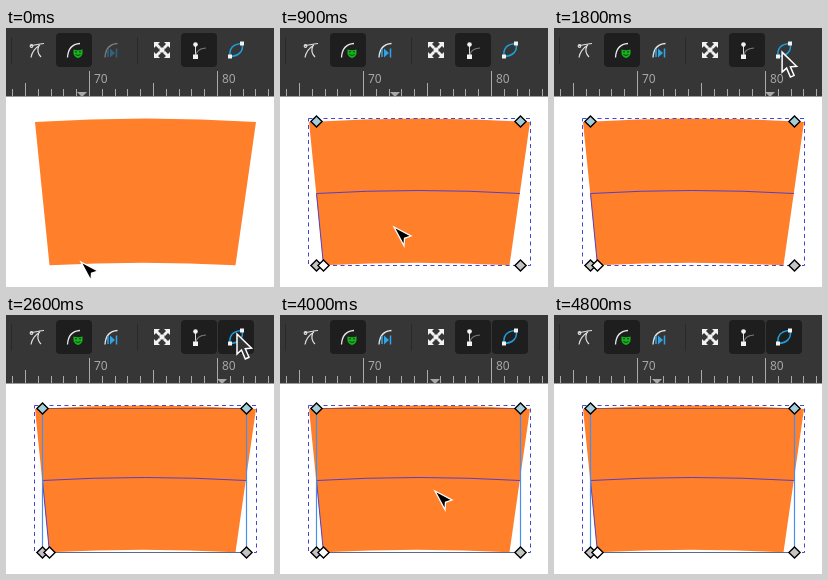
Animation, 268 px wide and 259 px high, one loop 5.3 s. Source, as an HTML page:

```html
<!DOCTYPE html>
<html lang="en">
<head>
<meta charset="utf-8">
<title>Node editing</title>
<style>
  html, body { margin: 0; width: 100%; height: 100%; overflow: hidden; background: #fff; }
  svg { display: block; width: 268px; height: 259px; }
  text { font: 12px "Noto Sans", "Open Sans", sans-serif; fill: #a6a6a6; }
</style>
</head>
<body>
<svg viewBox="0 0 268 259" fill="none">
  <defs>
    <path id="arc" d="M61.5 29.5C62 21 66 16 74 15.5" stroke="#e6e6e6" stroke-width="1.3"/>
    <path id="node" d="M0 -5.6L5.6 0L0 5.6L-5.6 0Z" stroke="#000" stroke-width="1.4"/>
    <path id="arrowOut" d="M-8 -8h6l-2 2 3 3-2 2-3-3-2 2z" fill="#f2f2f2"/>
  </defs>

  <rect width="268" height="259" fill="#fff"/>
  <path d="M29 94Q139.500 87 250 94L229.500 237.300Q137 232.300 43.500 237.300Z" fill="#ff7f2a"/>

  <g id="selection">
    <rect x="28.500" y="90.500" width="222" height="147" stroke="#4747d6" stroke-dasharray="4 3.500"/>
    <path d="M43.500 237.500L36.500 165.500Q138 159.500 240 165.500" stroke="#5540c8"/>
    <g id="outline">
      <path d="M36.500 93.500H240.500" stroke="#96504a"/>
      <path d="M36.500 93.500V237.500M240.500 93.500V237.500" stroke="#4590ee" stroke-width="1.200"/>
      <path d="M36.500 237.500H240.500" stroke="#596a91"/>
    </g>
    <g id="nodes"></g>
  </g>

  <rect width="268" height="68.500" fill="#363636"/>
  <path d="M5.500 9V36M131.500 9V36" stroke="#292929"/>
  <g fill="#1e1e1e">
    <rect x="50" y="5" width="36" height="34" rx="4"/>
    <rect x="175" y="5" width="36" height="34" rx="4"/>
    <rect id="outlineButton" x="212" y="5" width="36" height="34" rx="4"/>
  </g>

  <g stroke="#e0e0e0" stroke-width="1.200">
    <path d="M25 17.500C29 17.500 31 16 38 15.500M25 29.500C26 24 29 20 34 17M33 17.500C31 22 32 26 35 29"/>
    <circle cx="25.500" cy="18" r="1.300"/>
  </g>
  <use href="#arc"/>
  <path d="M67.500 21.500Q72 23 76.500 21.500V26Q75 29.500 72 30Q69 29.500 67.500 26Z" fill="#13b51a"/>
  <path d="M69 23.800h2M73 23.800h2M69.500 26.500Q72 28.500 74.500 26.500" stroke="#123b12"/>
  <g id="nextIcon">
    <use href="#arc" x="37.500"/>
    <path d="M104 20.500L109 25L104 29.500Z" fill="#2fa4e7"/>
    <path d="M110.500 20.500V29.500M102 21V29" stroke="#2fa4e7" stroke-width="1.500"/>
  </g>
  <g id="transformIcon"><rect x="153.500" y="19.500" width="5" height="5" fill="#f2f2f2"/></g>
  <path d="M189.500 17V28" stroke="#ddd"/>
  <path d="M190 28C190 23 193 20.500 200 20" stroke="#777" stroke-width="1.200"/>
  <circle cx="189.500" cy="16.500" r="2.300" fill="#f2f2f2"/>
  <rect x="187" y="26.500" width="5" height="4.500" fill="#f2f2f2"/>
  <path d="M224 28.500C223 20 227 16 236 15.500C238 23 233 28 224 28.500Z" stroke="#1c9fdc" stroke-width="1.500"/>
  <path d="M222 26.500h4v4h-4zM234 13.500h4v4h-4z" fill="#f2f2f2"/>

  <path id="ticks" stroke="#aaa"/>
  <text x="88" y="55">70</text>
  <text x="216" y="55">80</text>
  <path id="marker" d="M-5 64H5L0 69Z" fill="#a9a9a9"/>

  <path id="canvasCursor" d="M0 0L17 9L10.500 11.300L10 18.700Z" fill="#000" stroke="#fff" stroke-width="1.300"/>
  <path id="pointer" d="M0 0V20L4.500 16L8.300 25L12 23.300L8.300 14.700L14.500 14.200Z" fill="#333" stroke="#fff" stroke-width="1.500"/>
</svg>
<script>
const LOOP = 5300, STEP = 100, RULER_BOTTOM = 68;
const $ = id => document.getElementById(id);

const use = (parent, ref, transform, fill) => {
  const el = document.createElementNS("http://www.w3.org/2000/svg", "use");
  el.setAttribute("href", ref);
  el.setAttribute("transform", transform);
  if (fill) el.setAttribute("fill", fill);
  parent.append(el);
};

for (const [x, y, fill] of [
  [36.5, 93.5, "#a4cedb"], [240.5, 93.5, "#a4cedb"],
  [36.5, 237.5, "#c4c4c4"], [240.5, 237.5, "#c4c4c4"], [43.5, 237.5, "#fff"]
]) use($("nodes"), "#node", `translate(${x} ${y})`, fill);

for (let i = 0; i < 4; i++) use($("transformIcon"), "#arrowOut", `translate(156 22) rotate(${i * 90})`);

let ticks = "";
for (let unit = 64; unit <= 84; unit++) {
  const top = unit % 10 === 0 ? 43 : unit % 5 === 0 ? 55 : 61;
  ticks += `M${Math.round(83 + (unit - 70) * 12.8) + 0.5} ${top}V68`;
}
$("ticks").setAttribute("d", ticks);

const ease = {
  linear: p => p,
  hold: p => p < 1 ? 0 : 1,
  in: p => p ** 1.4,
  out: p => 1 - (1 - p) ** 2,
  inOut: p => p * p * (3 - 2 * p)
};

// Each key: time, values, easing used to arrive there.
const cursorKeys = [
  [0, [75, 234]],
  [200, [74.6, 236], "hold"],
  [300, [74.6, 236], "hold"],
  [700, [114, 199], "inOut"],
  [900, [114, 199], "hold"],
  [1400, [205, 65], "inOut"],
  [2000, [231, 19], "out"],
  [3300, [231, 19], "hold"],
  [3600, [197, 99], "in"],
  [3900, [155, 175], "out"],
  [4000, [155, 176], "hold"],
  [4200, [155, 176], "hold"],
  [4700, [65.5, 3], "in"],
  [LOOP, [65.5, 3], "hold"]
];
const markerKeys = [
  [0, [76]],
  [300, [76], "hold"],
  [700, [115], "inOut"],
  [900, [115], "hold"],
  [1400, [205], "inOut"],
  [1700, [216], "out"],
  [3500, [216], "hold"],
  [3600, [202], "linear"],
  [3900, [158], "out"],
  [4000, [155], "hold"],
  [4200, [155], "hold"],
  [4500, [103], "in"],
  [LOOP, [103], "hold"]
];

function sample(keys, t) {
  const i = keys.findIndex(key => key[0] > t);
  const [t0, from] = keys[i - 1], [t1, to, easing] = keys[i];
  const p = ease[easing]((t - t0) / (t1 - t0));
  return from.map((v, k) => v + (to[k] - v) * p);
}

const show = (id, on) => $(id).setAttribute("visibility", on ? "inherit" : "hidden");
const place = (id, x, y) => $(id).setAttribute("transform", `translate(${x} ${y})`);

function render(time) {
  const t = Math.floor((time % LOOP) / STEP) * STEP;
  const [x, y] = sample(cursorKeys, t);
  const onCanvas = y > RULER_BOTTOM, visible = t < 4800;

  place("canvasCursor", x, y);
  place("pointer", x, y);
  place("marker", sample(markerKeys, t)[0], 0);
  show("canvasCursor", visible && onCanvas);
  show("pointer", visible && !onCanvas);
  show("selection", t >= 900);
  show("outlineButton", t >= 2100);
  show("outline", t >= 2200);
  $("nextIcon").setAttribute("opacity", t >= 900 ? 1 : 0.4);
}

const start = performance.now();
function tick() {
  render(performance.now() - start);
  requestAnimationFrame(tick);
}
tick();
</script>
</body>
</html>
```
